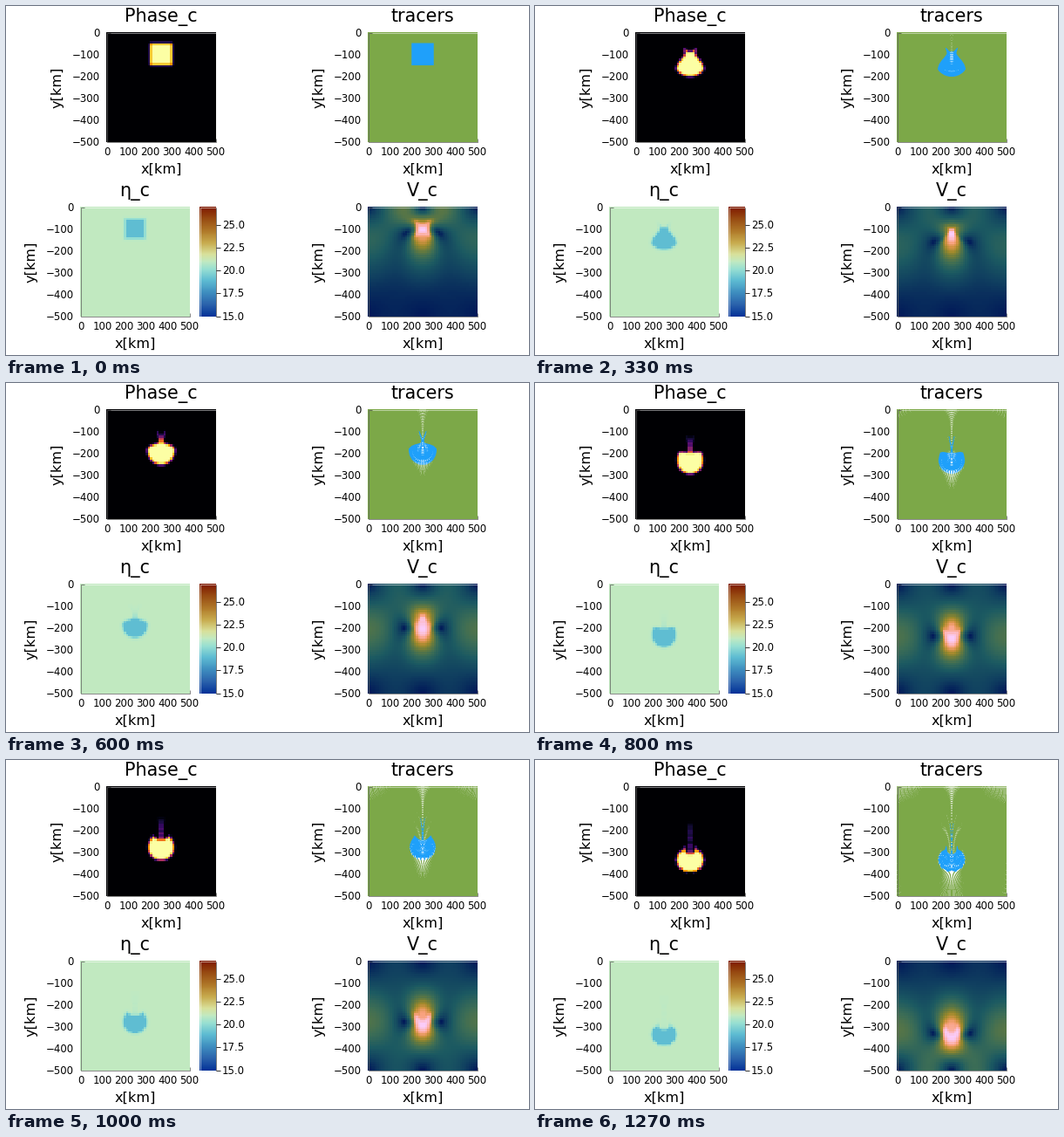
A matplotlib script that plays this animation: 600x400 px, repeating every 1340 ms.

```python
"""Sinking of a weak, dense block in a viscous box (2-D Stokes flow)."""
import numpy as np
import matplotlib.pyplot as plt
from matplotlib.animation import FuncAnimation
from matplotlib.collections import LineCollection
from matplotlib.colors import LinearSegmentedColormap

W, H, DPI = 600, 400, 100
TICKS, TICK_MS = 134, 10     # one loop of 1340 ms
STATES, STATE_MS = 20, 200 / 3
BOX = 126            # panel edge in pixels
M, N = 25, 50        # cells of the left half: across, down (10 km each)
PER_CELL = 4         # tracers per cell edge
SUBSTEPS = 2
SUB, DOT = 4, 4      # subpixels per pixel, tracer dot size in subpixels

# Depth of the block's lower edge (in cells) at a few states
KEY_STATES = [0, 3, 7, 9, 12, 15, 19]
KEY_DEPTHS = [15.0, 17.8, 22.6, 25.3, 29.4, 33.6, 39.0]

batlow = LinearSegmentedColormap.from_list("batlow", [
    "#011959", "#103f60", "#1c5a62", "#3c6d56", "#687b3e",
    "#9d892b", "#d29343", "#f8a17b", "#fdb7bc", "#faccfa"])
roma_r = LinearSegmentedColormap.from_list("roma_r", [
    (0, "#033198"), (0.11, "#2b63ac"), (0.22, "#3f8fc0"), (0.333, "#5fbdd3"),
    (0.43, "#97dfd2"), (0.5, "#c1eac2"), (0.57, "#d9e09a"), (0.67, "#c8ac4f"),
    (0.78, "#b07929"), (0.89, "#984c13"), (1, "#7e1700")])
TRACER_RGB = np.array([[255, 255, 255], [124, 168, 73], [31, 161, 250]]) / 255

# ---- Stokes solver: stream function on nodes, free slip on every side ----
n_dof = (M - 1) * (N - 1)
node_id = np.full((M + 1, N + 1), n_dof)
node_id[1:M, 1:N] = np.arange(n_dof).reshape(M - 1, N - 1)


def stencil(i_range, j_range, offsets):
    i, j = np.meshgrid(i_range, j_range, indexing="ij")
    return np.stack([node_id[i + a, j + b].ravel() for a, b in offsets], axis=1)


def pair_index(ids):
    return (ids[:, :, None] * (n_dof + 1) + ids[:, None, :]).ravel()


node_ids = stencil(range(1, M), range(1, N), [(-1, 0), (1, 0), (0, -1), (0, 1)])
cell_ids = stencil(range(M), range(N), [(0, 0), (1, 0), (0, 1), (1, 1)])
shear = np.array([1, 1, -1, -1])
stretch = np.array([1, -1, -1, 1])
slope_x = np.array([-0.5, 0.5, -0.5, 0.5])
pairs = np.concatenate([pair_index(node_ids), pair_index(cell_ids)])


def corner_mean(f):
    return (f[1:, 1:] + f[:-1, 1:] + f[1:, :-1] + f[:-1, :-1]) / 4


def solve_flow(phase, eta):
    """Staggered velocities: across on vertical, down on horizontal cell faces."""
    weights = np.concatenate([
        np.outer(corner_mean(eta).ravel(), np.outer(shear, shear)).ravel(),
        np.outer(eta.ravel(), 4 * np.outer(stretch, stretch)).ravel()])
    size = n_dof + 1
    a = np.bincount(pairs, weights, size * size).reshape(size, size)
    rhs = np.bincount(cell_ids.ravel(), np.outer(phase.ravel(), slope_x).ravel(), size)
    psi = np.append(np.linalg.solve(a[:-1, :-1], rhs[:-1]), 0)[node_id]
    return -np.diff(psi, axis=1), np.diff(psi, axis=0)


def sample(f, x, z):
    i = np.clip(np.floor(x).astype(int), 0, f.shape[0] - 2)
    j = np.clip(np.floor(z).astype(int), 0, f.shape[1] - 2)
    p, q = x - i, z - j
    return ((1 - p) * (1 - q) * f[i, j] + p * (1 - q) * f[i + 1, j]
            + (1 - p) * q * f[i, j + 1] + p * q * f[i + 1, j + 1])


def velocity(u, w, x, z):
    u_pad = np.pad(u, ((0, 0), (1, 1)), mode="edge")
    w_pad = np.pad(w, ((1, 1), (0, 0)), mode="edge")
    return sample(u_pad, x, z + 0.5), sample(w_pad, x + 0.5, z)


def move(x, z, u, w, dt):
    vx, vz = velocity(u, w, x, z)
    vx, vz = velocity(u, w, np.clip(x + dt / 2 * vx, 0, M),
                      np.clip(z + dt / 2 * vz, 0, N))
    return np.clip(x + dt * vx, 0, M), np.clip(z + dt * vz, 0, N)


def cell_phase(x, z, block):
    """Distance-weighted share of block tracers around each cell centre."""
    i, j = np.floor(x - 0.5).astype(int), np.floor(z - 0.5).astype(int)
    p, q = x - 0.5 - i, z - 0.5 - j
    total, dense = np.zeros(M * N), np.zeros(M * N)
    for a in (0, 1):
        for b in (0, 1):
            cell = np.clip(i + a, 0, M - 1) * N + np.clip(j + b, 0, N - 1)
            w = (p if a else 1 - p) * (q if b else 1 - q)
            total += np.bincount(cell, w, M * N)
            dense += np.bincount(cell, w * block, M * N)
    return (dense / np.maximum(total, 1e-9)).reshape(M, N)


def mirror(half):
    return np.concatenate([half, half[:, ::-1]], axis=1)


def tracer_image(x, z, block):
    size = BOX * SUB
    canvas = np.zeros((size, size // 2), int)
    col = np.round(x * size / N - DOT / 2).astype(int)
    row = np.round(z * size / N - DOT / 2).astype(int)
    for kind in (0, 1):
        c, r = col[block == kind], row[block == kind]
        for a in range(DOT):
            for b in range(DOT):
                canvas[np.clip(r + a, 0, size - 1),
                       np.clip(c + b, 0, size // 2 - 1)] = kind + 1
    rgb = TRACER_RGB[canvas].reshape(BOX, SUB, BOX // 2, SUB, 3).mean(axis=(1, 3))
    return mirror(rgb)


def simulate():
    x, z = np.meshgrid((np.arange(M * PER_CELL) + 0.5) / PER_CELL,
                       (np.arange(N * PER_CELL) + 0.5) / PER_CELL)
    x, z = x.ravel(), z.ravel()
    block = ((x > 20) & (z > 5) & (z < 15)).astype(int)
    half_gap = 0.5 / PER_CELL
    states = []
    for k in range(STATES):
        for s in range(SUBSTEPS):
            phase = cell_phase(x, z, block)
            eta = 1 - 0.99 * phase
            u, w = solve_flow(phase, eta)
            if s == 0:
                speed = np.hypot(u[1:] + u[:-1], w[:, 1:] + w[:, :-1])
                states.append((mirror(phase.T), tracer_image(x, z, block),
                               mirror(21 + np.log10(eta).T), mirror(speed.T)))
            if k == STATES - 1:
                break
            low = np.argmax(z * block)
            goal = np.interp(k + (s + 1) / SUBSTEPS, KEY_STATES, KEY_DEPTHS)
            sinking = velocity(u, w, x[low], z[low])[1]
            dt = max(goal - half_gap - z[low], 0) / sinking
            x, z = move(x, z, u, w, dt)
    return states


# ---- Figure: one set of axes in pixel coordinates ----
TICK, GUIDE, TITLE = 11.7, 16.1, 20.7   # text sizes in pixels
PX = 72 / DPI

plt.rcParams["font.family"] = "DejaVu Sans"
fig = plt.figure(figsize=(W / DPI, H / DPI), dpi=DPI, facecolor="white")
ax = fig.add_axes([0, 0, 1, 1])
ax.axis("off")


def label(x, y, text, size, ha="center", **kw):
    ax.text(x, y, text, fontsize=size * PX, ha=ha, va="baseline", **kw)


def lines(segments, color, alpha):
    ax.add_collection(LineCollection(segments, colors=color, alpha=alpha,
                                     linewidths=PX, zorder=4))


def picture(left, top, width, height, data, **kw):
    """Image whose outermost pixels are half covered."""
    image = ax.imshow(data, extent=(left, left + width, top + height, top),
                      aspect="auto", interpolation="nearest", zorder=3, **kw)
    x0, x1, y0, y1 = left + 0.5, left + width - 0.5, top + 0.5, top + height - 0.5
    lines([[(x0, y0), (x1, y0), (x1, y1), (x0, y1), (x0, y0)]], "white", 0.5)
    return image


def panel(left, top, title, data, **kw):
    image = picture(left, top, BOX, BOX, data, **kw)
    x0, y0 = left + 0.5, top + 0.5
    x1, y1 = x0 + 125, y0 + 125
    lines([[(x0, y0), (x0, y1), (x1, y1)], [(x1, y1), (x1, y1 - 4)],
           [(x0, y0), (x0 + 4, y0)]], "black", 0.45)
    for v in range(0, 501, 100):
        shift = v / 4
        label(x0 + shift, top + 141.3, str(v), TICK)
        label(left - 7, top + 5 + shift, f"\u2212{v}" if v else "0", TICK, "right")
    label(left + 63, top - 12, title, TITLE)
    label(left + 63, top + 161.7, "x[km]", GUIDE)
    label(left - 51, top + 63, "y[km]", GUIDE, rotation=90, rotation_mode="anchor")
    return image


states = simulate()
first = states[0]
images = [
    panel(115, 30, "Phase_c", first[0], cmap="inferno", vmin=0, vmax=1),
    panel(415, 30, "tracers", first[1]),
    panel(85, 230, "\u03b7_c", first[2], cmap=roma_r, vmin=15, vmax=27),
    panel(415, 230, "V_c", first[3], cmap=batlow),
]

picture(222, 230, 19, BOX, np.linspace(27, 15, 256)[:, None], cmap=roma_r)
lines([[(240.5, 230.5), (240.5, 355.5)]], "black", 0.5)
for v in np.arange(15, 27, 2.5):
    y = 355.5 - (v - 15) / 12 * 125
    lines([[(240.5, y), (246, y)]], "black", 0.8)
    label(248, y + 4, f"{v:.1f}", TICK, "left")

ax.set_xlim(0, W)
ax.set_ylim(H, 0)


def update(tick):
    # states begin on whole hundredths of a second
    k = min(int((tick * TICK_MS + 4) / STATE_MS), STATES - 1)
    for image, data in zip(images, states[k]):
        image.set_data(data)
    speed = states[k][3]
    images[3].set_clim(speed.min(), speed.max())
    return images


anim = FuncAnimation(fig, update, frames=TICKS, interval=TICK_MS,
                     repeat=True, repeat_delay=0, blit=False)
plt.show()
```
